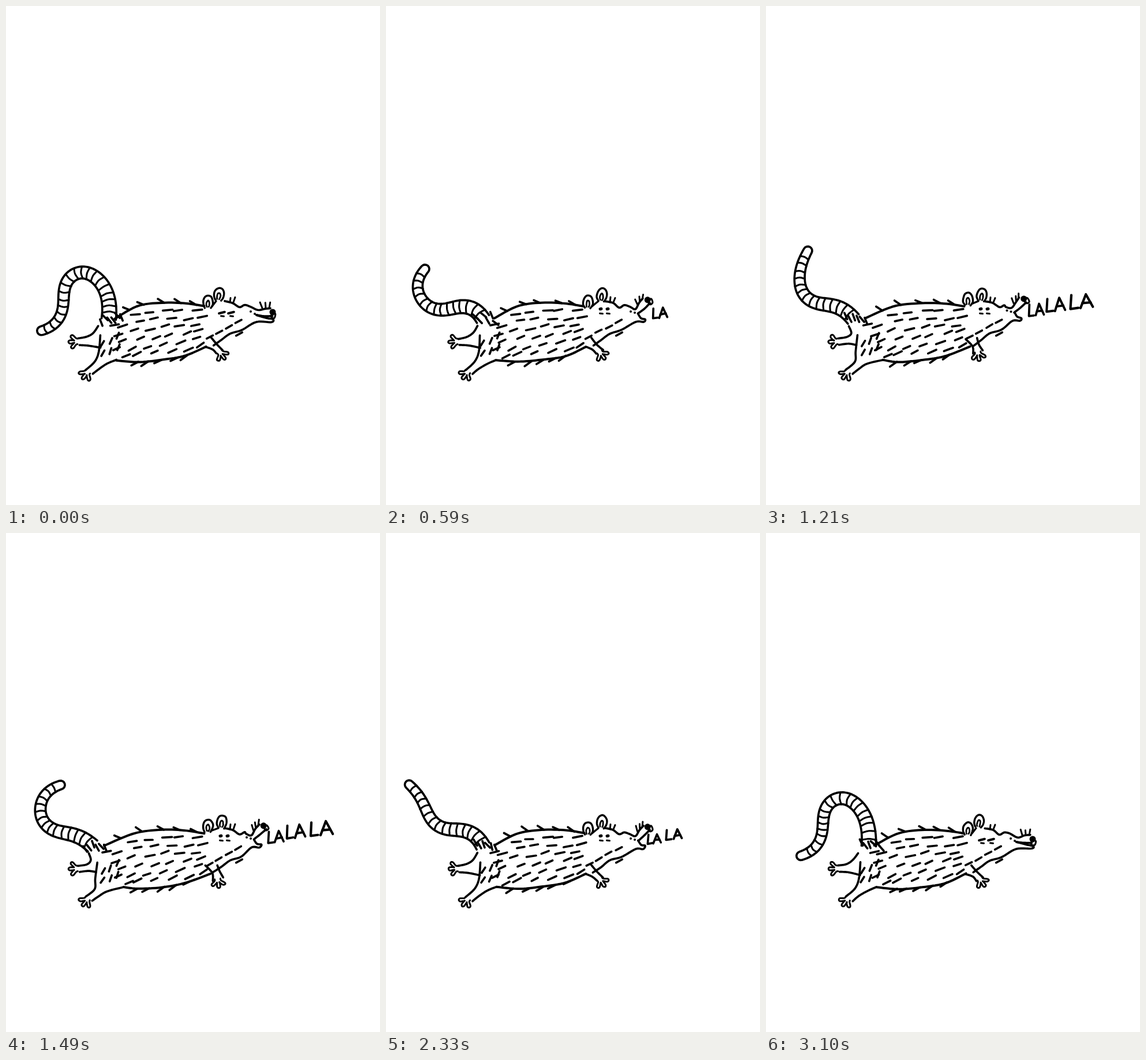
Animation, 648 px wide and 864 px high, one loop 3170 ms. Source, as an HTML page with a canvas:

```html
<!DOCTYPE html>
<html lang="en">
<head>
<meta charset="utf-8">
<title>Singing opossum</title>
<style>
html, body { margin: 0; width: 100%; height: 100%; overflow: hidden; background: #fff; }
canvas { display: block; width: 648px; height: 864px; }
</style>
</head>
<body>
<canvas id="stage" width="648" height="864"></canvas>
<script>
const ctx = document.getElementById('stage').getContext('2d');
const LOOP = 3170, INK = 3.7;

let seed = 1;
const rand = () => (seed = seed * 16807 % 2147483647) / 2147483647;
const wob = r => (rand() - .5) * 2 * r;
const mix = (a, b, u) => a.map((v, i) => v + (b[i] - v) * u);
function ease(from, to, t) {
  const u = Math.max(0, Math.min(1, (t - from) / (to - from)));
  return u * u * (3 - 2 * u);
}
const loop = (n, f) => Array.from({ length: n }, (_, i) => f(i));
const pairs = flat => loop(flat.length / 2, i => [flat[2 * i], flat[2 * i + 1]]);

// Value on a Catmull-Rom spline, s from 0 to 1.
function at(p, s) {
  const n = p.length - 1, i = Math.max(0, Math.min(n - 1, Math.floor(s * n))), u = s * n - i;
  const [a, b, c, d] = [p[Math.max(0, i - 1)], p[i], p[i + 1], p[Math.min(n, i + 2)]];
  return b.map((_, k) => b[k] + .5 * u * (c[k] - a[k] +
    u * (2 * a[k] - 5 * b[k] + 4 * c[k] - d[k] + u * (3 * (b[k] - c[k]) + d[k] - a[k]))));
}
function line(pts, width = INK) {
  ctx.lineWidth = width;
  ctx.beginPath();
  pts.forEach(p => ctx.lineTo(...p));
  ctx.stroke();
}
function curve(pts, width = INK, shake = .7) {
  const p = pts.map(([x, y]) => [x + wob(shake), y + wob(shake)]), n = p.length * 6;
  line(loop(n + 1, i => at(p, i / n)), width);
}
const path = (...flat) => curve(pairs(flat));
function dash(x, y, angle, half, width = INK) {
  const dx = Math.cos(angle) * half, dy = Math.sin(angle) * half;
  line([[x - dx, y - dy], [x + dx, y + dy]], width);
}
function dot(x, y, r) {
  ctx.beginPath();
  ctx.arc(x, y, r, 0, 7);
  ctx.fill();
}

// Tail shapes: heading in degrees at four places from base to tip.
const arch = [85, 143, 265, 198], side = [120, 175, 115, 135];
const hook = [122, 192, 125, 45], curl = [140, 168, 85, 12];
const beats = [[350, hook], [930, curl], [2330, hook], [2800, side]];

function tailShape(t, lift) {
  const k = Math.max(1, beats.findIndex(b => b[0] > t));
  const [from, peak] = beats[k - 1], to = beats[k][0];
  const wag = t > from && t < to ? Math.sin(Math.PI * (t - from) / (to - from)) : 0;
  return mix(arch, mix(side, peak, wag), lift);
}
function tail(x, y, headings, length) {
  const base = [x, y], knots = headings.map(h => [h + wob(2)]), N = 90;
  const upper = [], lower = [];
  let gap = 0;
  for (let i = 0; i <= N; i++) {
    const a = at(knots, i / N)[0] * Math.PI / 180, r = 12.5 - 5 * i / N;
    const c = Math.cos(a), s = Math.sin(a), edge = k => [x + s * r * k, y + c * r * k];
    upper.push(edge(-1));
    lower.push(edge(1));
    gap += length / N;
    if (gap > 11 && i < N - 2) {
      gap = wob(1.5);
      curve([edge(-1), [x + c * 2, y - s * 2], edge(1)], 3.1, .5);
    }
    if (i === N) for (let k = 1; k < 8; k++) {
      const turn = a + Math.PI / 2 - Math.PI * k / 8;
      upper.push([x - Math.cos(turn + Math.PI) * r, y - Math.sin(turn) * r]);
    }
    x += c * length / N;
    y -= s * length / N;
  }
  // The cap runs from the side where the first edge ends.
  const cap = upper.splice(N + 1);
  const near = (p, q) => Math.hypot(p[0] - q[0], p[1] - q[1]);
  if (near(cap[0], upper[N]) > near(cap[6], upper[N])) cap.reverse();
  line([...upper, ...cap, ...lower.reverse()]);
  loop(6, i => dash(base[0] - 13 + i * 7, base[1] + wob(7), 1 + wob(.35), 6));
}

// Three rounded toes in one stroke, open towards the leg.
function paw(x, y, dir) {
  const polar = (a, r) => [x + Math.cos(dir + a) * r, y + Math.sin(dir + a) * r];
  const toes = [-.85, 0, .85].flatMap(a =>
    [polar(a - .4, 6), polar(a - .2, 13), polar(a, 15), polar(a + .2, 13), polar(a + .4, 6)]);
  curve([polar(-1.8, 5), ...toes, polar(1.8, 5)], 3, .4);
}
function ear(x, y, tilt) {
  const arc = (rx, ry, lean) => loop(9, i => {
    const a = Math.PI * (-.3 + 1.6 * i / 8), u = -Math.cos(a) * rx, v = -Math.sin(a) * ry + lean;
    return [x + u - v * tilt, y + v + u * tilt];
  });
  curve(arc(8.5, 12, 0), 3.4, .5);
  curve(arc(2.8, 6, 3), 2.8, .4);
}

function fur(back, belly) {
  seed = 4242;
  const spots = loop(36, i => {
    const row = Math.floor(i / 6), u = (i % 6 + .2 + row % 2 * .4 + wob(.18)) / 6;
    const v = (row + .8 + wob(.2)) / 6.6;
    return [...mix(at(back, u), at(belly, u), v), -.08 - .45 * v + wob(.12), 6 + 2.5 * rand()];
  });
  loop(6, i => spots.push([168 + i % 3 * 13, 603 - i * 6 + wob(4), -1.15 + wob(.15), 5.5]));
  loop(4, i => spots.push([352 + 17 * i, 573 - 9 * i, -.5, 6]));
  return spots;
}

function la(x, y, w, h) {
  const stroke = (...flat) =>
    line(pairs(flat).map(([u, v]) => [x + u * w + wob(.5), y + v * h + wob(.5)]), 2.9 + w / 30);
  stroke(.06, .1, .02, 1, .36, .93);
  stroke(.46, .95, .7, .02, 1, .86);
  stroke(.54, .62, .9, .56);
}
function lyrics(t) {
  if (t < 430 || t >= 2750) return;
  if (t >= 1070 && t < 2190) {
    la(453 + wob(2), 515, 27, 22);
    la(486, 504 + wob(1), 32, 25);
    la(527, 499 + wob(1), 39, 26);
  } else if (t >= 770 && t < 2500) {
    const grow = ease(770, 930, t) - ease(2190, 2330, t);
    la(453 + 7 * grow, 521 - 5 * grow, 23, 17 + 5 * grow);
    la(485 + 11 * grow, 513 - 7 * grow, 28 + 12 * grow, 18 + 6 * grow);
  } else la(462, 522, 25, 19);
}

function head(lift, lean) {
  // The snout turns up around the corner of the mouth; the jaw drops.
  const px = 432 - 7 * lean, py = 530 - 2 * lean, turn = -.785 * lift;
  const c = Math.cos(turn), s = Math.sin(turn);
  const up = (u, v) => [px + u * c - v * s, py + u * s + v * c];
  const nape = [[379, 511], [393, 514], [404, 522], [413, 518], [px - 9, 521]];
  curve([...nape, up(4, -3), up(16, -6), up(26, -7)]);
  curve([up(29, 7), up(14, 7), up(2, 5)]);
  const tip = 31 - 14 * lift;
  curve([up(2, 5), [px + tip * .6, py + 10], [px + tip, py + 12], [px + tip - 3, py + 17],
    [px + 1, py + 17], [408, 561], [388, 567], [373, 578], [359, 588]]);
  dash(404, 568, -.5, 6);

  const [nx, ny] = up(30, 0);
  dot(nx, ny, 5.5);
  curve([up(30, 2), up(35, 3), up(33, 10), up(28, 9), up(28, 3)], 3, .5);
  loop(3, i => {
    const [x, y] = up(12 + 6 * i, -7);
    line([[x, y], [x - 3 + 2 * i + wob(1), y - 9 + wob(1)]], 3);
  });
  dot(px - 1, py + 3 - 2 * lift, 2);
  dot(px - 8, py - 1, 2);

  for (const x of [374 - 2 * lift, 390 - 6 * lift]) {
    const y = 531 - 6.5 * lift;
    dash(x, y, -.25, 5 - 4 * lift, 4 + lift);
    dash(x + 1, y + 8 - 2 * (1 - lift), .1, 2.5, 3);
  }
  const y1 = 513 - 5 * lean;
  ear(350, y1, .05);
  ear(369 + 5 * lift, 500 + lift, .15);
  line([[357, y1 + 7], [364 + 4 * lift, 511]], 3.3);
  loop(2, i => line([[388 + 6 * i, 513], [389 + 8 * i, 505 + wob(1)]], 3));
}

function opossum(t, step) {
  const lift = ease(100, 380, t) - ease(2700, 3000, t);
  const lean = ease(1000, 1250, t) - ease(2050, 2260, t);
  const back = pairs([188 - 18 * lean, 541, 228 - 6 * lean, 520, 270, 514, 310, 515, 343, 520]);
  const belly = pairs([191 + 12 * lean, 613, 230, 616, 270, 613, 310, 606, 346 + 8 * lean, 590]);
  const spots = fur(back, belly);
  seed = 7919 * (step + 3);

  tail(178 - 10 * lift - 18 * lean, 542, tailShape(t, lift), 240 - 62 * lift);
  curve(back, 4);
  curve(belly, 4);
  path(163 - 5 * lean, 570, 161 - 6 * lean, 598, 154, 616, 138, 630);
  path(150, 637, 160, 629, 175, 620, ...belly[0]);
  path(125, 576, 140, 573, 151 - 4 * lean, 566, 159 - 16 * lean, 554);
  path(127, 587, 143, 588 - 3 * lean, 163 - 7 * lean, 592 - 5 * lean);
  path(356 + 10 * lean, 575, 366 + 4 * lean, 586, 376, 596);
  path(346, 590 - 14 * lean, 358, 595 - 6 * lean, 365 - 7 * lean, 602);
  paw(141, 634, 2.2);
  paw(123, 581, 3.1);
  paw(371 - 4 * lean, 600, .95 + .5 * lean);

  loop(5, i => {
    const [x, y] = at(back, .15 + i * .18 + wob(.03));
    line([[x, y], [x - 11, y - 6 + wob(2)]]);
    const [p, q] = at(belly, .22 + i * .14 + wob(.03));
    line([[p, q], [p - 12, q + 7 + wob(2)]]);
  });
  for (const [x, y, angle, half] of spots) dash(x + wob(1.2), y + wob(1), angle + wob(.06), half);
  head(lift, lean);
}

// The drawing is redone every 70 ms, with a single shorter step midway.
function draw(now) {
  const t = now % LOOP;
  const step = t < 30 ? 0 : Math.floor((t - 30 + (t >= 860 ? 10 : 0)) / 70) + 1;
  const start = step ? 70 * step - 40 - (step > 12 ? 10 : 0) : 0;
  ctx.fillStyle = '#fff';
  ctx.fillRect(0, 0, 648, 864);
  ctx.fillStyle = ctx.strokeStyle = '#000';
  ctx.lineCap = ctx.lineJoin = 'round';
  opossum(start, step);
  lyrics(start);
}
const begin = performance.now();
function tick() {
  draw(performance.now() - begin);
  requestAnimationFrame(tick);
}
tick();
</script>
</body>
</html>
```
